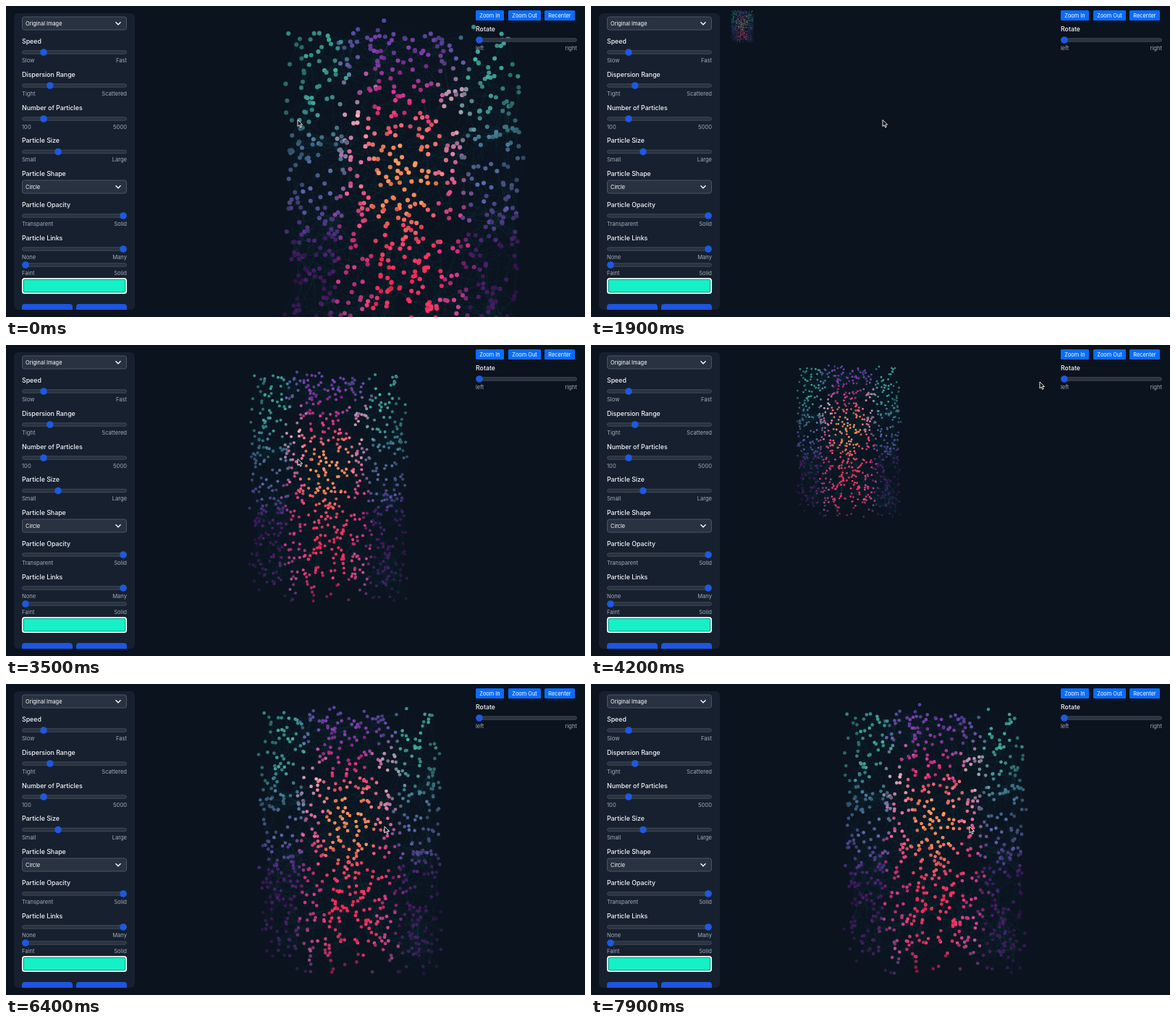
An HTML page with a canvas for the animation above (8000 ms loop, 800x430 px).

```html
<!DOCTYPE html>
<html lang="en">
<head>
<meta charset="utf-8">
<title>Particle controls</title>
<style>
  html, body { margin: 0; width: 800px; height: 430px; overflow: hidden; background: #0b131f; }
  canvas, svg { position: absolute; left: 0; top: 0; display: block; }
  text { font: 7.4px Inter, "Open Sans", sans-serif; fill: #fff; dominant-baseline: central; }
  text.head { font-size: 8.8px; font-weight: 500; fill: #f3f5f8; }
  text.note { font-size: 7.6px; fill: #a3abb8; }
  .end { text-anchor: end; }
  .mid { text-anchor: middle; }
</style>
</head>
<body>
<canvas id="cloud" width="800" height="430"></canvas>
<svg id="ui" width="800" height="430"></svg>
<script>
const LOOP = 8000, STEP = 100, RECENTER = 5100;
const W = 249, H = 368, COUNT = 880, REACH = 45;
const ctx = document.getElementById('cloud').getContext('2d');
const ui = document.getElementById('ui');

// ---- Controls ----
const rect = (x, y, w, h, r, fill, more = '') =>
  `<rect x="${x}" y="${y}" width="${w}" height="${h}" rx="${r}" fill="${fill}" ${more}/>`;
const text = (x, y, s, cls = '') => `<text x="${x}" y="${y}" class="${cls}">${s}</text>`;
const head = (y, s) => text(22, y, s, 'head');
const slider = (x, y, w, value, low, high) =>
  rect(x + .5, y - 2.2, w - 1, 4.4, 2.2, '#29323e', 'stroke="#48515e" stroke-width=".8"') +
  `<circle cx="${x + 5 + value * (w - 10)}" cy="${y}" r="4.8" fill="#1d59e0"/>` +
  text(x, y + 11, low, 'note') + text(x + w, y + 11, high, 'note end');
const control = (y, s, ...rest) => head(y, s) + slider(22, y + 16, 145, ...rest);
const select = (y, s) =>
  rect(22.5, y - 9, 144, 18, 3, '#283240', 'stroke="#4a5462"') + text(27, y, s) +
  `<path d="M151.5 ${y - 1.8}l3.5 3.6 3.5-3.6" fill="none" stroke="#fff" stroke-width="1.3"/>`;
const button = (x, w, s, id) =>
  rect(x, 6, w, 14, 1.5, '#0a6cff', `id="${id}"`) + text(x + w / 2, 13, s, 'mid');
const tab = x => `<path d="M${x} 420v-4q0-4 4-4h62q4 0 4 4v4z" fill="#1d56e0"/>`;

ui.innerHTML =
  rect(11, 10, 167, 410, 6, '#17202e') +
  select(24, 'Original Image') +
  control(48, 'Speed', .185, 'Slow', 'Fast') +
  control(94, 'Dispersion Range', .25, 'Tight', 'Scattered') +
  control(140, 'Number of Particles', .185, '100', '5000') +
  control(185.5, 'Particle Size', .333, 'Small', 'Large') +
  head(231.5, 'Particle Shape') + select(250, 'Circle') +
  control(274, 'Particle Opacity', 1, 'Transparent', 'Solid') +
  control(320, 'Particle Links', 1, 'None', 'Many') +
  slider(22, 358, 145, 0, 'Faint', 'Solid') +
  rect(22.8, 376.8, 143.4, 20.4, 3, '#15f0c6', 'stroke="#fff" stroke-width="1.7"') +
  rect(24.2, 378.2, 140.6, 17.6, 2, 'none', 'stroke="#23625f" stroke-width=".7"') +
  tab(22) + tab(97) +
  button(649, 39, 'Zoom In', 'in') + button(694, 45, 'Zoom Out', 'out') + button(744, 42, 'Recenter', 'recenter') +
  text(649, 31, 'Rotate', 'head') + slider(649, 47, 140, 0, 'left', 'right') +
  `<g id="arrow"><path d="M0 0v9l2.1-1.9 1.5 3.3 1.6-.7-1.5-3.2h2.9z" fill="#080b10" stroke="#fff" stroke-width=".9"/></g>
   <g id="hand"><path d="M-1 0q1-1 1.7 0v3l3 .8q1 .4.8 1.5l-.7 3h-4.3l-2.6-3.6q.5-1 2.1.2z" fill="#080b10" stroke="#fff" stroke-width=".8"/></g>`;
const [recenter, arrow, hand] = ['recenter', 'arrow', 'hand'].map(id => document.getElementById(id));

// ---- Cloud ----
let seed = 20;
const rnd = () => {
  seed = seed + 0x6D2B79F5 | 0;
  let n = Math.imul(seed ^ seed >>> 15, 1 | seed);
  n = n + Math.imul(n ^ n >>> 7, 61 | n) ^ n;
  return ((n ^ n >>> 14) >>> 0) / 4294967296;
};
const spread = size => (rnd() - .5) * size;
const clamp = v => Math.min(1, Math.max(0, v));
const mix = (a, b, p) => a.map((v, i) => v + (b[i] - v) * p);

// Top to bottom gradients: middle, shoulder and side of the figure
const [core, rim, side] = [
  '50459f 8a2f96 ee3078 ff8a5a ff8656 fa3a60 ff2a58 e43468 7a1838',
  '46408c 5f4f94 e4b0b4 d870a0 dc4482 cc2c74 c83080 b84888 44305f',
  '3a8a88 3aa28e 3c8486 44698c 55569a 482070 40195a 38205a 2a1c40'
].map(row => row.split(' ').map(hex => hex.match(/../g).map(h => parseInt(h, 16))));

function shade(stops, v) {
  const p = v * (stops.length - 1), i = Math.min(stops.length - 2, Math.floor(p));
  return mix(stops[i], stops[i + 1], p - i);
}

function tint(x, y) {
  const d = Math.abs(x / W - .5) * 2 + spread(.12), v = clamp(y / H + spread(.06));
  const inner = mix(shade(core, v), shade(rim, v), clamp((d - .24) / .12));
  const rgb = mix(inner, shade(side, v), clamp((d - .46) / .12));
  const light = (d > .85 ? .8 : 1) * (1 + spread(.3));
  return `rgb(${rgb.map(c => Math.round(Math.min(255, c * light)))})`;
}

const dots = [];
while (dots.length < COUNT) {
  const x = rnd() * W, y = rnd() * H;
  if ((y > H * .93 || y < H * .03) && rnd() < .6) continue;
  dots.push({
    x, y, color: tint(x, y), amp: 1.5 + rnd() * 3,
    px: rnd() * 2 * Math.PI, py: rnd() * 2 * Math.PI,
    kx: 1 + Math.floor(rnd() * 2), ky: 1 + Math.floor(rnd() * 2)
  });
}

const links = [];
dots.forEach((a, i) => {
  for (const b of dots.slice(i + 1))
    if (Math.hypot(a.x - b.x, a.y - b.y) < REACH && rnd() < .15) links.push([a, b]);
});

// ---- Motion ----
// time, log of scale, pan x, pan y
const home = [0, 179, 31];
const views = [[0, Math.log(1.31), 164, 18], [700, Math.log(2.4), 167, 19], [1900, Math.log(.125), 172, 42],
  [2150, Math.log(.125), 172, 42], [2700, Math.log(3), 174, 22], [2900, Math.log(3), 174, 22],
  [3700, Math.log(.574), 196, 46]];
// time, x, y
const pointer = [[0, 403, 157.5], [3900, 403, 157.5], [4200, 620, 51],
  [4700, 764, 10], [5700, 764, 10], [6200, 523, 197]];

function at(keys, t) {
  const i = keys.findIndex(k => k[0] > t);
  if (i < 0) return keys[keys.length - 1].slice(1);
  const a = keys[i - 1], b = keys[i];
  return mix(a, b, (t - a[0]) / (b[0] - a[0])).slice(1);
}

function drawCloud(t) {
  const [logScale, panX, panY] = t < RECENTER ? at(views, t) : home;
  const s = Math.exp(logScale), w = t / LOOP * 2 * Math.PI;
  for (const d of dots) {
    d.sx = 172 + s * (panX + d.x + d.amp * Math.sin(w * d.kx + d.px));
    d.sy = s * (panY + d.y + d.amp * Math.sin(w * d.ky + d.py));
  }
  ctx.clearRect(0, 0, 800, 430);
  ctx.save();
  ctx.beginPath();
  ctx.rect(178, 0, 605.5, 430);
  ctx.clip();
  ctx.beginPath();
  for (const [a, b] of links) {
    ctx.moveTo(a.sx, a.sy);
    ctx.lineTo(b.sx, b.sy);
  }
  ctx.lineWidth = .3 + .3 * s;
  ctx.strokeStyle = 'rgba(60,190,190,.055)';
  ctx.stroke();
  for (const d of dots) {
    ctx.fillStyle = d.color;
    ctx.beginPath();
    ctx.arc(d.sx, d.sy, .1 + 2.25 * s, 0, 7);
    ctx.fill();
  }
  ctx.restore();
}

function frame(now) {
  const t = Math.floor(now % LOOP / STEP) * STEP;
  drawCloud(t);
  const [x, y] = at(pointer, t), hover = x > 744 && y < 20;
  recenter.setAttribute('fill', hover ? '#1650b4' : '#0a6cff');
  for (const [el, on] of [[arrow, !hover], [hand, hover]]) {
    el.setAttribute('transform', `translate(${x} ${y})`);
    el.setAttribute('visibility', on ? 'visible' : 'hidden');
  }
}
const start = performance.now();
(function tick() {
  frame(performance.now() - start);
  requestAnimationFrame(tick);
})();
</script>
</body>
</html>
```
